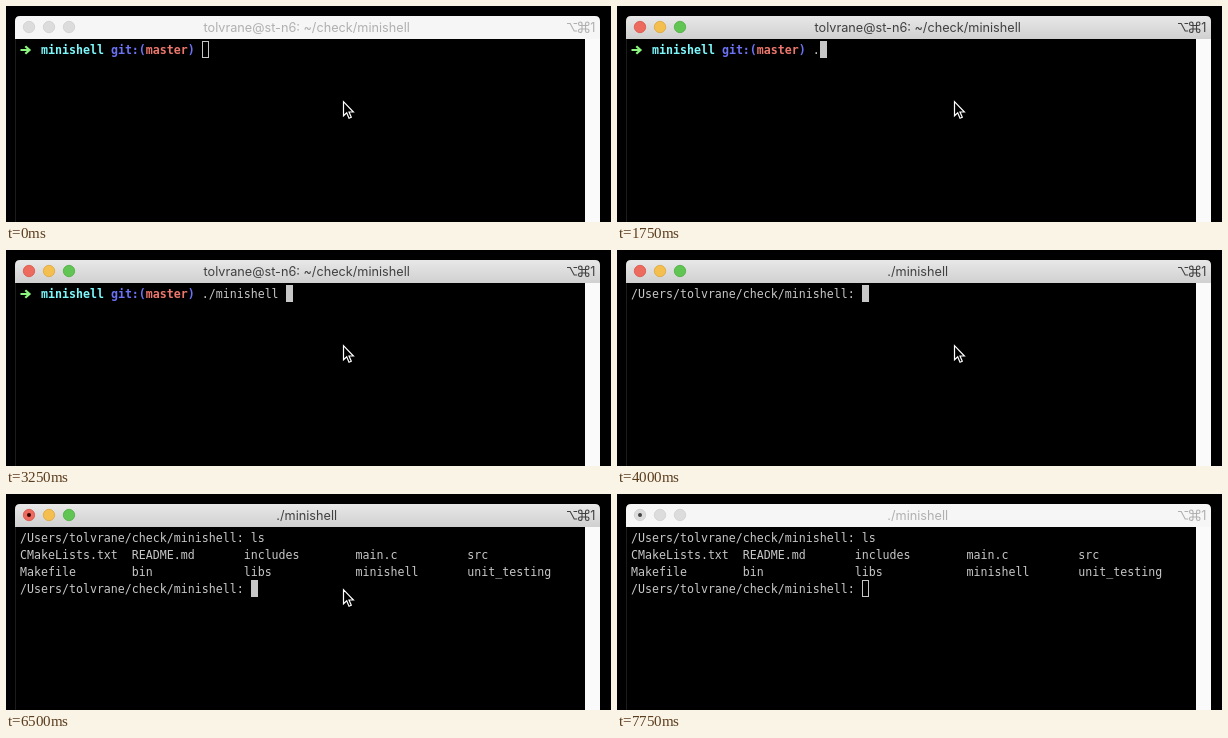
Recreate the animation shown at these times as an HTML page. Size 605 by 216 pixels, loop 8000 ms.

```html
<!DOCTYPE html>
<html lang="en">
<head>
<meta charset="utf-8">
<title>Terminal session</title>
<style>
  html, body { margin: 0; width: 100%; height: 100%; overflow: hidden; background: #000; }
  svg { display: block; width: 605px; height: 216px; }
  .mono { font: 11.628px "DejaVu Sans Mono", monospace; fill: #c7c7c7; white-space: pre; }
  .bold { font-weight: bold; }
  .ui { font: 12.7px Inter, sans-serif; }
</style>
</head>
<body>
<svg viewBox="0 0 605 216">
  <defs>
    <linearGradient id="barFill" x2="0" y2="1">
      <stop stop-color="#e8e8e8"/>
      <stop offset="1" stop-color="#d0d0d0"/>
    </linearGradient>
  </defs>
  <rect width="605" height="216"/>
  <rect x="9" y="33" width="1" height="183" fill="#1c1c1c"/>
  <rect x="579" y="33" width="15" height="183" fill="#fafafa"/>
  <path id="bar" d="M9 33V15q0-5 5-5h575q5 0 5 5v18z"/>
  <g id="lights" stroke-width=".8">
    <circle cx="23" cy="21" r="5.7"/>
    <circle cx="43" cy="21" r="5.7"/>
    <circle cx="63" cy="21" r="5.7"/>
  </g>
  <circle id="edited" cx="23" cy="21" r="2"/>
  <g id="caption" class="ui">
    <text id="title" x="300.7" y="25.6" text-anchor="middle"></text>
    <text x="589.5" y="25.6" text-anchor="end">1</text>
    <path id="keys" fill="none" stroke-width="1.1" d="M561 17.5h3.2l4 7.5h3M567.5 17.5h3.7
      M576 19.5v-1.75a1.75 1.75 0 1 0-1.75 1.75h7a1.75 1.75 0 1 0-1.75-1.75v7a1.75 1.75 0 1 0 1.75-1.75h-7a1.75 1.75 0 1 0 1.75 1.75z"/>
  </g>
  <g id="zshPrompt">
    <path d="M14.5 44h8.5M19.3 40.2l4.2 3.8-4.2 3.8" fill="none" stroke="#8bf67e" stroke-width="2.2"/>
    <text class="mono bold" x="35" y="48"><tspan fill="#7df9fd">minishell</tspan> <tspan fill="#6c72f4">git:(</tspan><tspan fill="#ed776d">master</tspan><tspan fill="#6c72f4">)</tspan></text>
  </g>
  <g id="rows">
    <text class="mono" x="14" y="48"></text>
    <text class="mono" x="14" y="65"></text>
    <text class="mono" x="14" y="82"></text>
    <text class="mono" x="14" y="99"></text>
  </g>
  <rect id="caret" stroke="#c7c7c7" width="6" height="16"/>
  <path id="pointer" d="M337.5 95.7v14.1l3.2-3 2.3 5.4 2.3-1-2.3-5.2h4.4z" stroke="#fff" stroke-width="1.2"/>
</svg>
<script>
const LOOP = 8000, CELL = 7, LINE = 17;
const LAUNCH = 4000, EDITED = 4750, OUTPUT = 6500, POINTER_GONE = 7250;
const PROMPT = "/Users/tolvrane/check/minishell: ";
const ZSH_PAD = " ".repeat(26);
const FILES = [
  ["CMakeLists.txt", "README.md", "includes", "main.c", "src"],
  ["Makefile", "bin", "libs", "minishell", "unit_testing"],
];
const LISTING = FILES.map(row => row.map(name => name.padEnd(16)).join("").trimEnd());
const LAUNCH_KEYS = [[1750, "."], [2000, "./"], [2500, "./m"], [2750, "./min"], [3000, "./mini"], [3250, "./minishell "]];
const LIST_KEYS = [[5500, "l"], [5750, "ls"]];
const LIGHTS = [["#ed6a5e", "#d85549"], ["#f5bf4f", "#dba73c"], ["#61c554", "#4fae42"]];

const el = id => document.getElementById(id);
const show = (node, on) => node.setAttribute("visibility", on ? "visible" : "hidden");
const paint = (node, fill, stroke) => {
  node.setAttribute("fill", fill);
  if (stroke) node.setAttribute("stroke", stroke);
};
const setText = (node, value) => {
  if (node.textContent !== value) node.textContent = value;
};
const typed = (keys, t) => keys.reduce((text, [at, value]) => t >= at ? value : text, "");

function terminalLines(t) {
  if (t < LAUNCH) return [ZSH_PAD + typed(LAUNCH_KEYS, t)];
  const command = PROMPT + typed(LIST_KEYS, t);
  return t < OUTPUT ? [command] : [command, ...LISTING, PROMPT];
}

function render(t) {
  const focused = t >= 500 && t < 7750;
  const ink = focused ? "#404040" : "#b0b0b0";
  const lines = terminalLines(t);

  paint(el("bar"), focused ? "url(#barFill)" : "#f6f6f6");
  [...el("lights").children].forEach((light, i) =>
    paint(light, ...(focused ? LIGHTS[i] : ["#dcdcdc", "#d0d0d0"])));
  paint(el("edited"), focused ? "#300" : "#444");
  show(el("edited"), t >= EDITED);
  paint(el("caption"), ink);
  el("keys").setAttribute("stroke", ink);
  setText(el("title"), t < LAUNCH ? "tolvrane@st-n6: ~/check/minishell" : "./minishell");

  show(el("zshPrompt"), t < LAUNCH);
  [...el("rows").children].forEach((row, i) => setText(row, lines[i] || ""));

  const last = lines.length - 1;
  el("caret").setAttribute("x", 14.5 + lines[last].length * CELL);
  el("caret").setAttribute("y", 35.5 + last * LINE);
  paint(el("caret"), focused ? "#c7c7c7" : "none");
  show(el("pointer"), t < POINTER_GONE);
}

const start = performance.now();
function tick() {
  render((performance.now() - start) % LOOP);
  requestAnimationFrame(tick);
}
tick();
</script>
</body>
</html>
```
